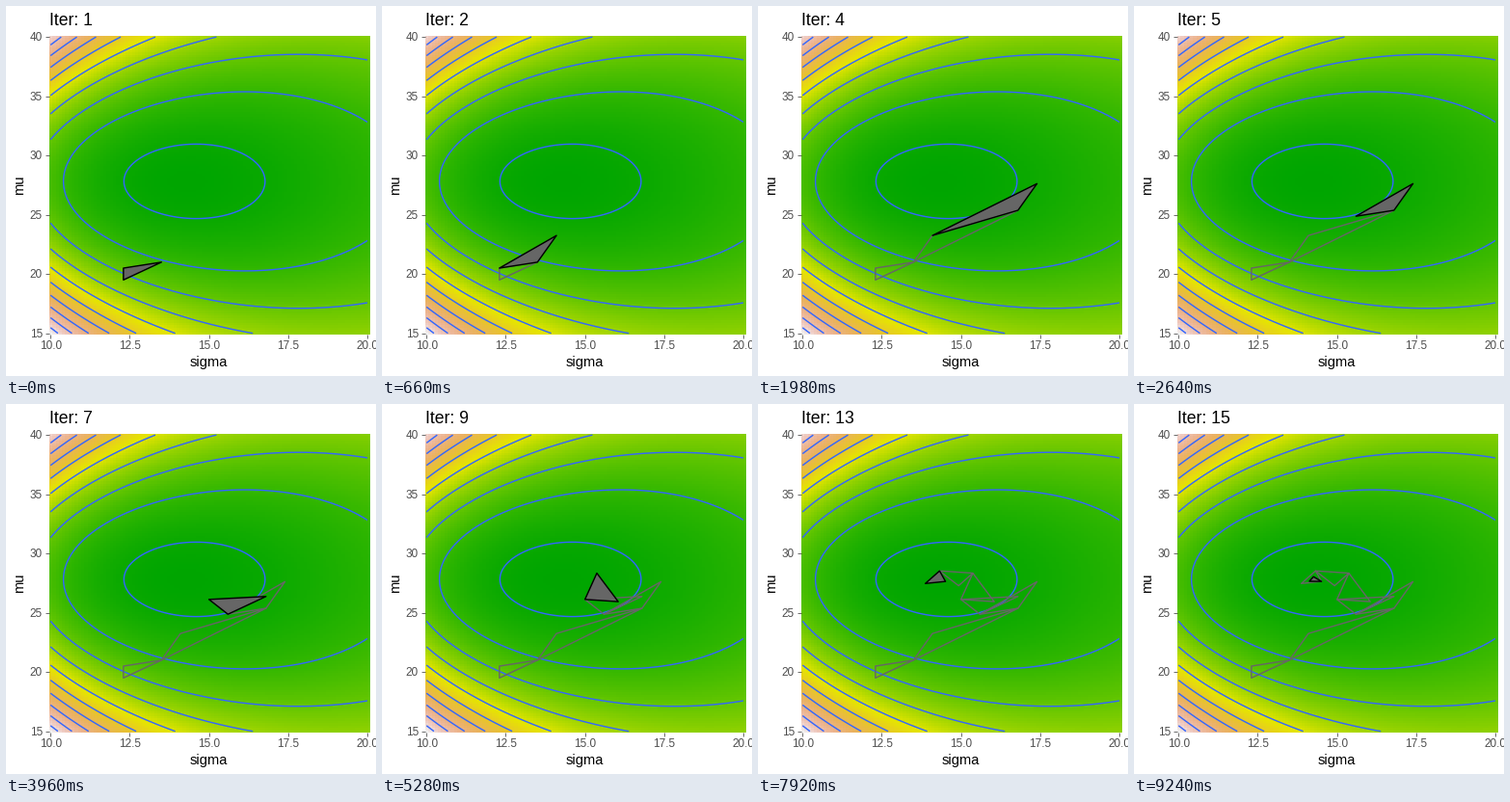
Recreate the animation shown at these times as a matplotlib script. Size 384 by 384 pixels, loop 9900 ms.

```python
import numpy as np
import matplotlib.pyplot as plt
from matplotlib.animation import FuncAnimation
from matplotlib.colors import LinearSegmentedColormap, hsv_to_rgb
from matplotlib.patches import Polygon

SIZE, DPI = 384, 96
STEPS, STEP_MS = 15, 660
LEFT, RIGHT, TOP, BOTTOM = 44.6, 376.67, 30.9, 340.9
MEAN, VAR = 27.82, 203.3          # sample moments behind the likelihood
LINE = 1.07

plt.rcParams["font.family"] = "Liberation Sans"


def px(sigma):
    return LEFT + (np.asarray(sigma) - 9.95) / 10.1 * (RIGHT - LEFT)


def py(mu):
    return BOTTOM - (np.asarray(mu) - 14.9) / 25.2 * (BOTTOM - TOP)


def nll(sigma, mu):
    """Mean negative log-likelihood of a normal sample."""
    return (0.5 * np.log(2 * np.pi) + np.log(sigma)
            + (VAR + (mu - MEAN) ** 2) / (2 * sigma ** 2))


def next_simplex(simplex):
    """One Nelder-Mead step with inside contraction."""
    best, mid, worst = sorted(simplex, key=lambda p: nll(*p))
    centre = (best + mid) / 2
    away = centre - worst
    reflected = centre + away
    if nll(*reflected) < nll(*best):
        expanded = centre + 2 * away
        new = min(reflected, expanded, key=lambda p: nll(*p))
    elif nll(*reflected) < nll(*mid):
        new = reflected
    else:
        new = centre - away / 2
    return [best, mid, new]


def terrain():
    low = [(h, 1, v) for h, v in zip(np.linspace(1 / 3, 1 / 6, 5),
                                     np.linspace(0.65, 0.9, 5))]
    high = list(zip(np.linspace(1 / 6, 0, 6), np.linspace(1, 0, 6),
                    np.linspace(0.9, 0.95, 6)))[1:]
    return LinearSegmentedColormap.from_list("terrain10", hsv_to_rgb(low + high), N=512)


simplexes = [[np.array(p) for p in ((12.3, 20.5), (12.3, 19.5), (13.5, 21.0))]]
while len(simplexes) < STEPS:
    simplexes.append(next_simplex(simplexes[-1]))

fig = plt.figure(figsize=(SIZE / DPI, SIZE / DPI), dpi=DPI, facecolor="white")
ax = fig.add_axes([0, 0, 1, 1])
ax.axis("off")

# Surface and contour lines
sigmas, mus = np.linspace(10, 20, 101), np.linspace(15, 40, 126)
surface = nll(*np.meshgrid(sigmas, mus))
ax.imshow(surface, cmap=terrain(), origin="lower", interpolation="nearest",
          extent=(LEFT, RIGHT, BOTTOM, TOP), aspect="auto")
ax.contour(px(sigmas), py(mus), surface, levels=np.arange(4.1, 5.06, 0.1),
           colors="#3366FF", linewidths=LINE)
ax.set(xlim=(0, SIZE), ylim=(SIZE, 0))

# Axes
tick = dict(color="#333333", lw=0.535, solid_capstyle="butt")
label = dict(color="#4D4D4D", size=8.8, va="baseline")
for s in np.arange(10, 20.1, 2.5):
    ax.plot([px(s)] * 2, [BOTTOM, BOTTOM + 3.67], **tick)
    ax.text(px(s), 355.7, f"{s:.1f}", ha="center", **label)
for m in range(15, 41, 5):
    ax.plot([LEFT - 3.67, LEFT], [py(m)] * 2, **tick)
    ax.text(LEFT - 6.6, py(m) + 4.2, str(m), ha="right", **label)
ax.text((LEFT + RIGHT) / 2, 373.6, "sigma", size=11, ha="center", va="baseline")
ax.text(18, (TOP + BOTTOM) / 2, "mu", size=11, ha="center", va="baseline",
        rotation=90, rotation_mode="anchor")
title = ax.text(LEFT, 20, "", size=13.2, va="baseline")


def triangle(simplex, **style):
    s, m = np.transpose(simplex)
    return ax.add_patch(Polygon(np.column_stack([px(s), py(m)]), lw=LINE,
                                joinstyle="round", **style))


# Every second step leaves its outline behind
trail = {i: triangle(simplexes[i], fill=False, ec="#666666", zorder=3)
         for i in range(0, STEPS, 2)}
current = triangle(simplexes[0], fc="#666666", ec="black", zorder=4)


def update(i):
    title.set_text(f"Iter: {i + 1}")
    s, m = np.transpose(simplexes[i])
    current.set_xy(np.column_stack([px(s), py(m)]))
    for k, outline in trail.items():
        outline.set_visible(k < i)
    return [title, current, *trail.values()]


anim = FuncAnimation(fig, update, frames=STEPS, interval=STEP_MS,
                     repeat=True, repeat_delay=0, blit=False)
plt.show()
```
